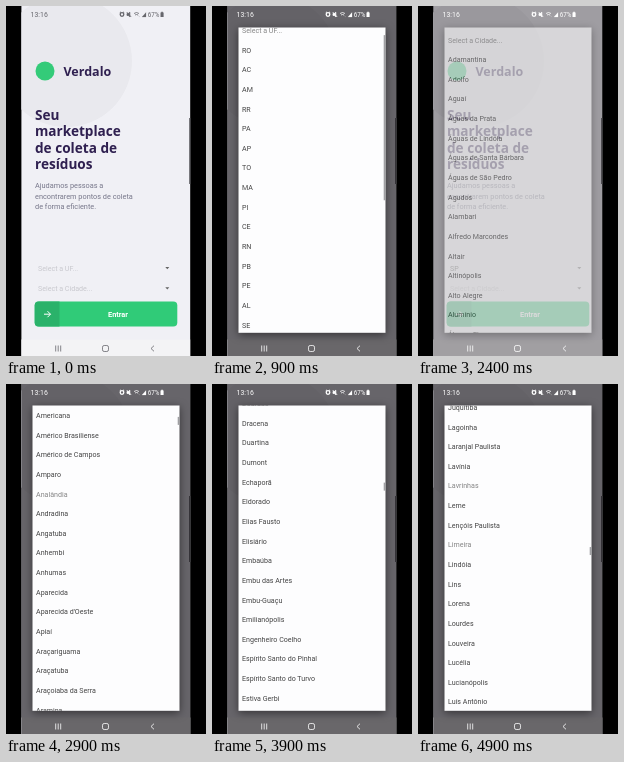
Write an HTML page that moves like this. It is 200 by 350 pixels and loops after 5000 ms.

```html
<!DOCTYPE html>
<html lang="pt-BR">
<head>
<meta charset="utf-8">
<style>
html, body { margin: 0; width: 100%; height: 100%; overflow: hidden; background: #000; }
svg { display: block; }
text { font-family: Roboto, sans-serif; font-size: 7.1px; }
.title { font: bold 13.6px "Open Sans", sans-serif; fill: #2f2050; }
.info { font-size: 7.35px; fill: #77778a; }
.field { fill: #c8c8ce; }
.rows text { fill: #444; }
.rows .pale { fill: #858585; }
.card { filter: drop-shadow(0 2px 4px rgba(0, 0, 0, .5)); }
</style>
</head>
<body>
<svg width="200" height="350" viewBox="0 0 200 350">
  <rect width="200" height="350"/>
  <svg x="15.4" width="168.8" height="350" viewBox="15.4 0 168.8 350">
    <rect x="15" width="170" height="350" fill="#f0f0f5"/>
    <circle cx="60" cy="55" r="66" fill="#e9e9ee"/>
    <circle cx="39" cy="65" r="9.5" fill="#34cb79"/>
    <text class="title" x="57.5" y="70" style="font-size:12.5px">Verdalo</text>
    <text class="title" x="29" y="114">Seu</text>
    <text class="title" x="29" y="130.4">marketplace</text>
    <text class="title" x="29" y="146.8">de coleta de</text>
    <text class="title" x="29" y="163.2">resíduos</text>
    <text class="info" x="29" y="181.7">Ajudamos pessoas a</text>
    <text class="info" x="29" y="192.5">encontrarem pontos de coleta</text>
    <text class="info" x="29" y="203.3">de forma eficiente.</text>
    <text class="field" id="state" x="32" y="264.5">Select a UF...</text>
    <text class="field" x="32" y="284.8">Select a Cidade...</text>
    <path d="M159.3 261h4l-2 2.2zM159.3 281.3h4l-2 2.2z" fill="#666"/>
    <rect x="28.7" y="295.6" width="142.6" height="24.8" rx="4" fill="#30cb78"/>
    <path d="M53.5 295.6H32.7a4 4 0 0 0-4 4v16.8a4 4 0 0 0 4 4h20.8z" fill="#2ab26a"/>
    <path d="M38 308.2h6.5m-3-3 3 3-3 3" fill="none" stroke="#fff"/>
    <text x="112" y="310.8" text-anchor="middle" font-weight="bold" fill="#fff" style="font-size:7.4px">Entrar</text>
    <rect x="15" y="333.5" width="170" height="16.5" fill="#f3f3f5"/>
    <rect x="183" y="112" width="2" height="66" fill="#77777c"/>
    <rect id="dim" x="15" width="170" height="350" fill="#060208"/>
    <g id="system">
      <text x="24.6" y="10.7" style="font-size:6.9px">13:16</text>
      <circle cx="116" cy="8.5" r="1.8" fill="none" stroke="currentColor" stroke-width="1.3"/>
      <path d="M113.7 6.8l1.3-1m3.3 1-1.3-1M121 7.5h1.3l1.5-1.3v4.6l-1.5-1.3H121zM120.7 6l4.5 5" stroke="currentColor" stroke-width=".8"/>
      <path d="M128 7.5q2.5-2 5 0M129 9q1.5-1 3 0" fill="none" stroke="currentColor" stroke-width=".8"/>
      <path d="M131.5 9l2.5 2M136 11l4-4.5V11z" stroke="currentColor" stroke-width=".2"/>
      <text x="141.8" y="10.7" style="font-size:6.3px">67%</text>
      <path d="M154.5 6.5h.8v-.8h1.5v.8h.8V11h-3.1z"/>
      <g fill="none" stroke="currentColor" stroke-width=".8">
        <path d="M49.7 339.5v6m2.5-6v6m2.5-6v6M148 339.7l-3 2.8 3 2.8"/>
        <rect x="96.5" y="339.5" width="6" height="6" rx="1.7"/>
      </g>
    </g>
  </svg>
  <g id="dialog">
    <rect class="card" x="26.5" y="21.5" width="147" height="305.3" fill="#fdfdfe"/>
    <rect id="ripple" y="166" height="20" rx="2" fill="#efeff0"/>
    <svg x="26" y="21.5" width="148" height="305.3" viewBox="26 21.5 148 305.3">
      <g class="rows" id="states"></g>
      <g class="rows" id="cities"></g>
    </svg>
    <rect id="bar" x="171.7" width="2" fill="#a0a0a3"/>
  </g>
</svg>
<script>
const ROW = 19.64, FIRST = 34, VIEW = 306, TRACK = 300;
const states = "Select a UF...,RO,AC,AM,RR,PA,AP,TO,MA,PI,CE,RN,PB,PE,AL,SE,BA,MG,ES,RJ,SP,PR,SC,RS,MS,MT,GO,DF".split(",");
const cities = `Select a Cidade...,Adamantina,Adolfo,Aguaí,Águas da Prata,Águas de Lindóia,Águas de Santa Bárbara,Águas de São Pedro,Agudos,Alambari,Alfredo Marcondes,Altair,Altinópolis,Alto Alegre,Alumínio,Álvares Florence,Álvares Machado,Álvaro de Carvalho,Alvinlândia,Americana,Américo Brasiliense,Américo de Campos,Amparo,Analândia,Andradina,Angatuba,Anhembi,Anhumas,Aparecida,Aparecida d'Oeste,Apiaí,Araçariguama,Araçatuba,Araçoiaba da Serra,Aramina,Arandu,Arapeí,Araraquara,Araras,Arco-Íris,Arealva,Areias,Areiópolis,Ariranha,Artur Nogueira,Arujá,Aspásia,Assis,Atibaia,Auriflama,Avaí,Avanhandava,Avaré,Bady Bassitt,Balbinos,Bálsamo,Bananal,Barão de Antonina,Barbosa,Bariri,Barra Bonita,Barra do Chapéu,Barra do Turvo,Barretos,Barrinha,Barueri,Bastos,Batatais,Bauru,Bebedouro,Bento de Abreu,Bernardino de Campos,Bertioga,Bilac,Birigui,Biritiba Mirim,Boa Esperança do Sul,Bocaina,Bofete,Boituva,Bom Jesus dos Perdões,Bom Sucesso de Itararé,Borá,Boracéia,Borborema,Borebi,Botucatu,Bragança Paulista,Braúna,Brejo Alegre,Brodowski,Brotas,Buri,Buritama,Buritizal,Cabrália Paulista,Cabreúva,Caçapava,Cachoeira Paulista,Caconde,Cafelândia,Caiabu,Caieiras,Caiuá,Cajamar,Cajati,Cajobi,Cajuru,Campina do Monte Alegre,Campinas,Campo Limpo Paulista,Campos do Jordão,Campos Novos Paulista,Cananéia,Canas,Cândido Mota,Cândido Rodrigues,Canitar,Capão Bonito,Capela do Alto,Capivari,Caraguatatuba,Carapicuíba,Cardoso,Casa Branca,Cássia dos Coqueiros,Castilho,Catanduva,Catiguá,Cedral,Cerqueira César,Cerquilho,Cesário Lange,Charqueada,Chavantes,Clementina,Colina,Colômbia,Conchal,Conchas,Cordeirópolis,Coroados,Coronel Macedo,Corumbataí,Cosmópolis,Cosmorama,Cotia,Cravinhos,Cristais Paulista,Cruzália,Cruzeiro,Cubatão,Cunha,Descalvado,Diadema,Dirce Reis,Divinolândia,Dobrada,Dois Córregos,Dolcinópolis,Dourado,Dracena,Duartina,Dumont,Echaporã,Eldorado,Elias Fausto,Elisiário,Embaúba,Embu das Artes,Embu-Guaçu,Emilianópolis,Engenheiro Coelho,Espírito Santo do Pinhal,Espírito Santo do Turvo,Estiva Gerbi,Estrela d'Oeste,Estrela do Norte,Euclides da Cunha Paulista,Fartura,Fernando Prestes,Fernandópolis,Fernão,Ferraz de Vasconcelos,Flora Rica,Floreal,Flórida Paulista,Florínea,Franca,Francisco Morato,Franco da Rocha,Gabriel Monteiro,Gália,Garça,Gastão Vidigal,Gavião Peixoto,General Salgado,Getulina,Glicério,Guaiçara,Guaimbê,Guaíra,Guapiaçu,Guapiara,Guará,Guaraçaí,Guaraci,Guarani d'Oeste,Guarantã,Guararapes,Guararema,Guaratinguetá,Guareí,Guariba,Guarujá,Guarulhos,Guatapará,Guzolândia,Herculândia,Holambra,Hortolândia,Iacanga,Iacri,Iaras,Ibaté,Ibirá,Ibirarema,Ibitinga,Ibiúna,Icém,Iepê,Igaraçu do Tietê,Igarapava,Igaratá,Iguape,Ilhabela,Ilha Comprida,Ilha Solteira,Indaiatuba,Indiana,Indiaporã,Inúbia Paulista,Ipaussu,Iperó,Ipeúna,Ipiguá,Iporanga,Ipuã,Iracemápolis,Irapuã,Irapuru,Itaberá,Itaí,Itajobi,Itaju,Itanhaém,Itaoca,Itapecerica da Serra,Itapetininga,Itapeva,Itapevi,Itapira,Itapirapuã Paulista,Itápolis,Itaporanga,Itapuí,Itapura,Itaquaquecetuba,Itararé,Itariri,Itatiba,Itatinga,Itirapina,Itirapuã,Itobi,Itu,Itupeva,Ituverava,Jaborandi,Jaboticabal,Jacareí,Jaci,Jacupiranga,Jaguariúna,Jales,Jambeiro,Jandira,Jardinópolis,Jarinu,Jaú,Jeriquara,Joanópolis,João Ramalho,José Bonifácio,Júlio Mesquita,Jumirim,Jundiaí,Junqueirópolis,Juquiá,Juquitiba,Lagoinha,Laranjal Paulista,Lavínia,Lavrinhas,Leme,Lençóis Paulista,Limeira,Lindóia,Lins,Lorena,Lourdes,Louveira,Lucélia,Lucianópolis,Luís Antônio,Luiziânia,Lupércio`.split(",");
const CITY_COUNT = 646;
const pale = ["Select a UF...", "Select a Cidade...", "MG", "Analândia", "Caiabu", "Cajuru", "Ibirarema", "Igaraçu do Tietê", "Lavrinhas", "Limeira"];

const el = id => document.getElementById(id);
const set = (id, attrs) => { for (const k in attrs) el(id).setAttribute(k, attrs[k]); };

function fill(id, names) {
  names.forEach((name, i) => {
    const row = document.createElementNS("http://www.w3.org/2000/svg", "text");
    row.setAttribute("x", 30);
    row.setAttribute("y", FIRST + i * ROW + 2.5);
    if (pale.includes(name)) row.setAttribute("class", "pale");
    row.textContent = name;
    el(id).append(row);
  });
}
fill("states", states);
fill("cities", cities);

// Linear interpolation through [time, value] points
function track(t, points) {
  let [t0, v0] = points[0];
  for (const [t1, v1] of points) {
    if (t < t1) return t <= t0 ? v0 : v0 + (v1 - v0) * (t - t0) / (t1 - t0);
    [t0, v0] = [t1, v1];
  }
  return v0;
}

// Scroll offset that puts a city's row at height y
const cityAt = (name, y) => FIRST + cities.indexOf(name) * ROW - y;

const opening = [[0, 0], [100, .35], [200, .8], [300, 1], [1900, 1], [2000, .5], [2100, 0], [2300, 0], [2400, .6], [2500, 1]];
const stateScroll = [[800, 0], [900, 9.5], [1000, 72], [1100, 160], [1200, 222], [1300, 250.5]];
const cityScroll = [[2800, 0], [2900, cityAt("Americana", 31.5)], [3500, cityAt("Caiabu", 40.5)],
  [4300, cityAt("Iacanga", 38)], [4900, cityAt("Lagoinha", 43)]];
const barFade = [[300, 1], [600, 0], [800, 0], [900, 1], [1400, 1], [1600, 0], [1700, 0], [1800, 1],
  [2000, 1], [2100, 0], [2800, 0], [2900, 1]];

function draw(now) {
  const t = Math.floor(now % 5000 / 100) * 100;
  const picked = t >= 2100;
  const open = track(t, opening);
  const scroll = track(t, picked ? cityScroll : stateScroll);
  const total = (picked ? CITY_COUNT : states.length) * ROW + 6;

  set("dim", { opacity: open * .58 });
  set("dialog", { opacity: open });
  const ink = open > .5 ? "#fff" : "#66666c";
  set("system", { fill: ink, color: ink });

  el("state").textContent = picked ? "SP" : states[0];
  set("state", { style: picked ? "fill:#555" : "" });

  set("states", { display: picked ? "none" : "inline", transform: `translate(0 ${-scroll})` });
  set("cities", { display: picked ? "inline" : "none", transform: `translate(0 ${-scroll})` });
  set("bar", { y: 24 + scroll * TRACK / total, height: Math.max(8, TRACK * VIEW / total), opacity: track(t, barFade) });

  const wide = t >= 1900;
  set("ripple", { x: wide ? 26.5 : 54, width: wide ? 147 : 92, opacity: t >= 1800 && !picked ? 1 : 0 });
}

const start = performance.now();
function tick() {
  draw(performance.now() - start);
  requestAnimationFrame(tick);
}
tick();
</script>
</body>
</html>
```
